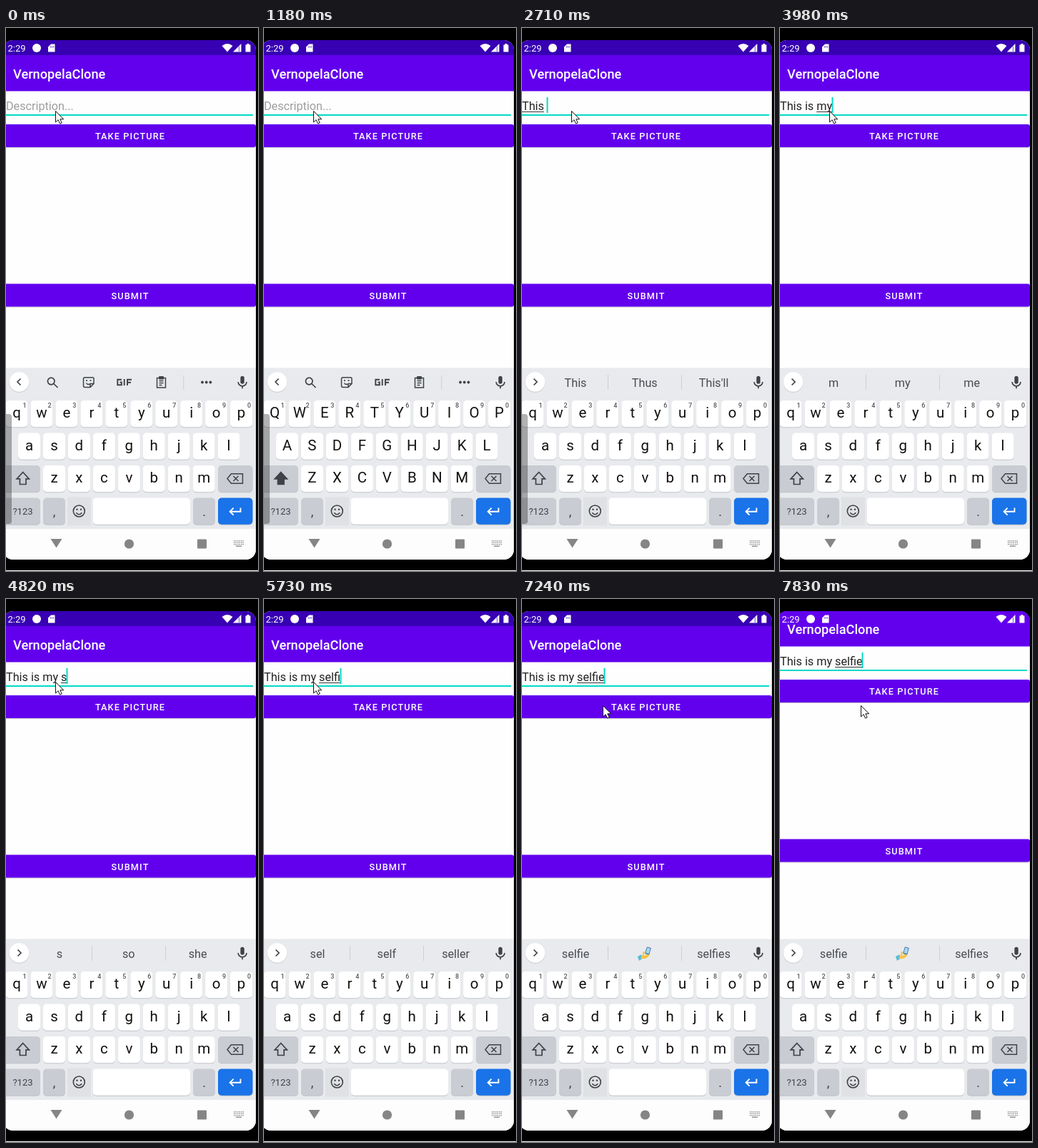
Animation of 353x761 px, one loop 8 s. Source, as an HTML page with a canvas:

```html
<!DOCTYPE html>
<html lang="en">
<head>
<meta charset="utf-8">
<title>Typing a description</title>
<style>
html, body { margin: 0; width: 100%; height: 100%; overflow: hidden; background: #000; }
canvas { display: block; }
</style>
</head>
<body>
<canvas id="stage" width="353" height="761"></canvas>
<script>
const c = document.getElementById('stage').getContext('2d');
const LOOP = 8000;
const PURPLE = '#6200ee', TEAL = '#03dac5', INK = '#3f4246';

// [start, committed text, word being composed, trailing text]
const typed = [
  [0, '', '', ''], [1420, '', 'T', ''], [1910, '', 'Th', ''], [2270, '', 'Thi', ''],
  [2710, '', 'This', ' '], [3020, 'This ', 'i', ''], [3410, 'This ', 'is', ''],
  [3680, 'This ', 'is', ' '], [3830, 'This is ', 'm', ''], [3980, 'This is ', 'my', ''],
  [4260, 'This is ', 'my', ' '], [4530, 'This is my ', 's', ''], [4970, 'This is my ', 'se', ''],
  [5270, 'This is my ', 'sel', ''], [5580, 'This is my ', 'self', ''],
  [5730, 'This is my ', 'selfi', ''], [5850, 'This is my ', 'selfie', '']
];
const hints = [
  [0], [1630, 'T', 'The', 'This'], [2060, 'Th', 'The', 'This'], [2430, 'Thi', 'This', 'Think'],
  [2710, 'This', 'Thus', "This'll"], [3140, 'i', 'is', 'it'], [3410, 'is', 'its', "it's"],
  [3830, 'm', 'my', 'me'], [4400, 'my', 'may', 'myself'], [4820, 's', 'so', 'she'],
  [5120, 'se', 'see', 'seen'], [5420, 'sel', 'self', 'seller'],
  [6000, 'selfie', 'selfies', 'self'], [6430, 'selfie', '', 'selfies']
];
const at = (list, t) => list.filter(s => s[0] <= t).pop();
const clamp = x => Math.max(0, Math.min(1, x));

function box(x, y, w, h, color, r = 0) {
  c.fillStyle = color;
  c.beginPath();
  c.roundRect(x, y, w, h, r);
  c.fill();
}
function dot(x, y, r, color) {
  c.fillStyle = color;
  c.beginPath();
  c.arc(x, y, r, 0, 7);
  c.fill();
}
function fill(d, color) {
  c.fillStyle = color;
  c.fill(new Path2D(d));
}
function line(d, color = INK, w = 1.7) {
  c.strokeStyle = color;
  c.lineWidth = w;
  c.stroke(new Path2D(d));
}
function text(s, x, y, size, color, align = 'center', weight = 400, gap = 0) {
  c.font = `${weight} ${size}px Roboto, sans-serif`;
  c.letterSpacing = gap + 'px';
  c.textAlign = align;
  c.fillStyle = color;
  c.fillText(s, x, y);
  const w = c.measureText(s).width;
  c.letterSpacing = '0px';
  return w;
}

function button(label, y) {
  box(-3, y + 1, 353, 32, 'rgba(0,0,0,.2)', 3);
  box(-3, y, 353, 32, PURPLE, 3);
  text(label, 174, y + 21, 12.7, '#fff', 'center', 500, 1.13);
}

function ripple(t) {
  const p = (t - 6970) / 270;
  if (p <= 0 || p >= 1) return;
  c.save();
  c.beginPath();
  c.roundRect(-3, 135, 353, 32, 3);
  c.clip();
  dot(114, 150, 20 + 380 * p, `rgba(255,255,255,${.24 * (1 - p)})`);
  c.restore();
}

function field(t) {
  const [, done, word, tail] = at(typed, t);
  let x = 0;
  if (word) {
    x = text(done, 0, 115, 16.2, '#212121', 'left');
    const w = text(word, x, 115, 16.2, '#212121', 'left');
    box(x, 117, w, 1, '#333');
    x += w + c.measureText(tail).width;
  } else {
    text('Description...', 0, 115, 16.2, '#9e9e9e', 'left');
  }
  box(0, 121, 346, 2, TEAL);
  const caret = t >= 300 && t < 900 || t >= 1420 && t < 6430 || t >= 6970;
  if (caret) box(Math.round(x) - .5, 97, 2, 22, TEAL);
}

function app(t) {
  c.save();
  if (t >= 7830) c.translate(0, -22);
  box(-4, 38, 354, 50.5, PURPLE);
  text('VernopelaClone', 10, 71, 18.2, '#fff', 'left', 500);
  field(t);
  button('TAKE PICTURE', 135);
  ripple(t);
  button('SUBMIT', 358.5);
  c.restore();
}

function statusIcons() {
  text('2:29', 2.5, 32.5, 13, '#fff', 'left');
  dot(43, 28, 6, '#fff');
  fill('M63 22.5H68.5V33.5H59V26.5Z', '#fff');
  line('M62.5 25.5V27.5M64.5 25.5V27.5M66.5 25.5V27.5', '#3700b3', .8);
  fill('M302.5 25Q310 19 317.5 25L310 33.5Z', '#fff');
  fill('M329.5 22V33.5H318Z', '#fff');
  line('M326.5 25.5V33', '#3700b3', .7);
  fill('M335.5 23.5H337.5V22H340.5V23.5H342.5V33.5H335.5Z', '#fff');
}

function key(x, y, w, color = '#fff') {
  box(x, y + 1, w, 37.3, '#bfc2c8', 5);
  box(x, y, w, 37.3, color, 5);
}

function letters(row, left, y, upper) {
  [...row].forEach((ch, i) => {
    const x = left + i * 34.95;
    key(x, y, 31);
    text(upper ? ch.toUpperCase() : ch, x + 15.5, y + 24, 20.5, '#111');
    if (left < 0) text((i + 1) % 10, x + 26.5, y + 10, 9, '#555', 'center', 500);
  });
}

function mic() {
  box(328.4, 487.7, 5.4, 11, INK, 2.7);
  line('M325.2 496a5.9 5.9 0 0 0 11.8 0M331.1 502V505.2');
}

function selfie() {
  fill('M162 501L167 498.5 170 503 164 507Z', '#55b9dd');
  line('M167 501.5Q173 504 177 498', '#f6c445', 4);
  line('M176 499L179 496M169.5 500L171 494', '#f6c445', 2.2);
  c.save();
  c.translate(176.5, 493);
  c.rotate(.3);
  box(-3.2, -5, 6.4, 10, '#4a7fae', 1);
  box(-2.2, -4, 4.4, 7.5, '#a8d8f0');
  c.restore();
}

function strip(t) {
  const [, ...words] = at(hints, t);
  dot(18.5, 497, 14, 'rgba(0,0,0,.1)');
  dot(18.5, 496, 13.7, '#fff');
  mic();
  if (words.length) {
    line('M16.5 491.5L21 496 16.5 500.5');
    words.forEach((w, i) => text(w, 75 + i * 96.8, 503, 16.2, '#484b50'));
    line('M120.5 486V507M223.5 486V507', '#cdd0d4', 1);
    if (!words[1]) selfie();
    return;
  }
  line('M20.5 491.5L16 496 20.5 500.5');
  line('M68 495a4.8 4.8 0 1 1-9.6 0a4.8 4.8 0 1 1 9.6 0M66.8 498.5L72.5 504');
  line('M110.5 489.8H121A2 2 0 0 1 123 491.8V498.5L118 503.5H110.5A2 2 0 0 1 108.5 501.5V491.8A2 2 0 0 1 110.5 489.8ZM118 503V498.5H122.5M112.5 497.5Q114 500.5 117 499', INK, 1.5);
  dot(113, 494, 1.1, INK);
  dot(118.5, 494, 1.1, INK);
  line('M162 492.8H156.3V500.2H161.8V496.5H159.5M165.7 492V501M170 501V492.8H176M170 496.8H175', INK, 1.9);
  line('M211.5 490.5H223.5V504H211.5ZM214.5 494.5H220.5M214.5 497.5H220.5M214.5 500.5H218.5', INK, 1.5);
  box(214, 488, 7, 4.5, INK, 1);
  line('M248.8 487V507', '#cdd0d4', 1);
  for (const x of [275, 280.7, 286.4]) dot(x, 496.5, 1.9, INK);
}

function keyboard(t) {
  const upper = t >= 1180 && t < 1630, gray = '#c9ccd2';
  box(-4, 476.5, 354, 225.5, '#e8eaed');
  strip(t);
  letters('qwertyuiop', -.5, 522, upper);
  letters('asdfghjkl', 17, 567.5, upper);
  letters('zxcvbnm', 52, 613, upper);

  key(-4, 613, 52, gray);
  const shift = 'M23.7 622.5L32.3 631.8H28V639.5H19.4V631.8H15.1Z';
  if (upper) fill(shift, INK);
  line(shift);
  key(297, 613, 48.5, gray);
  line('M310 631.5L315.5 624.8H331.5V638.2H315.5ZM318.5 628L325.5 635M325.5 628L318.5 635', INK, 1.5);

  key(-4, 658.5, 52, gray);
  text('?123', 23.5, 682, 13, INK);
  key(52, 658.5, 31, gray);
  text(',', 67.5, 684, 18, INK);
  box(86, 657.5, 33, 40, '#dfe1e4');
  line('M110.3 677a8 8 0 1 1-16 0a8 8 0 1 1 16 0M98.3 679.3Q102.3 684.3 106.3 679.3', INK, 1.6);
  dot(99.5, 674.8, 1.2, INK);
  dot(105, 674.8, 1.2, INK);
  key(121.5, 658.5, 136.5);
  key(262, 658.5, 31, gray);
  text('.', 277.5, 684, 18, INK);
  key(297, 658.5, 48.5, '#1a73e8');
  line('M328.5 672.5V677.7H314M318.7 672.7L313.7 677.7 318.7 682.7', '#fff', 1.9);
}

function navBar() {
  box(-4, 702, 354, 43, '#fdfdfd');
  fill('M62.5 716H78.5L70.5 728.5Z', '#858585');
  dot(172.5, 723, 6.6, '#858585');
  box(268, 716.5, 13, 13, '#858585', 1);
  for (let i = 0; i < 6; i++)
    for (let j = 0; j < 3; j++) box(319 + i * 2.5, 718 + j * 2.5, 1.5, 1.5, '#999');
  box(322, 725.5, 8, 1.5, '#999');
}

function pointer(t) {
  const p = clamp((t - 6000) / 810), e = p * p * (3 - 2 * p);
  c.save();
  c.translate(69.5 + 44 * e, 116.5 + 33 * e);
  const arrow = 'M0 0V15.5L3.6 12.2 6.1 17.6 8.7 16.4 6.3 11.3H11.2Z';
  fill(arrow, '#fff');
  line(arrow, '#111', 1);
  c.restore();
}

function draw(now) {
  const t = now % LOOP;
  box(0, 0, 353, 761, '#000');
  box(0, 760, 353, 1, '#fff');
  c.save();
  c.beginPath();
  c.roundRect(-4, 17, 354, 728, 14);
  c.clip();
  box(-4, 17, 354, 728, '#fefefe');
  box(-4, 17, 354, 21, '#3700b3');
  app(t);
  statusIcons();
  keyboard(t);
  navBar();
  box(-6, 541, 14, 154, `rgba(0,0,0,${.3 * (1 - clamp((t - 3350) / 480))})`, 4);
  c.restore();
  pointer(t);
}

const start = performance.now();
function tick() {
  draw(performance.now() - start);
  requestAnimationFrame(tick);
}
tick();
</script>
</body>
</html>
```
